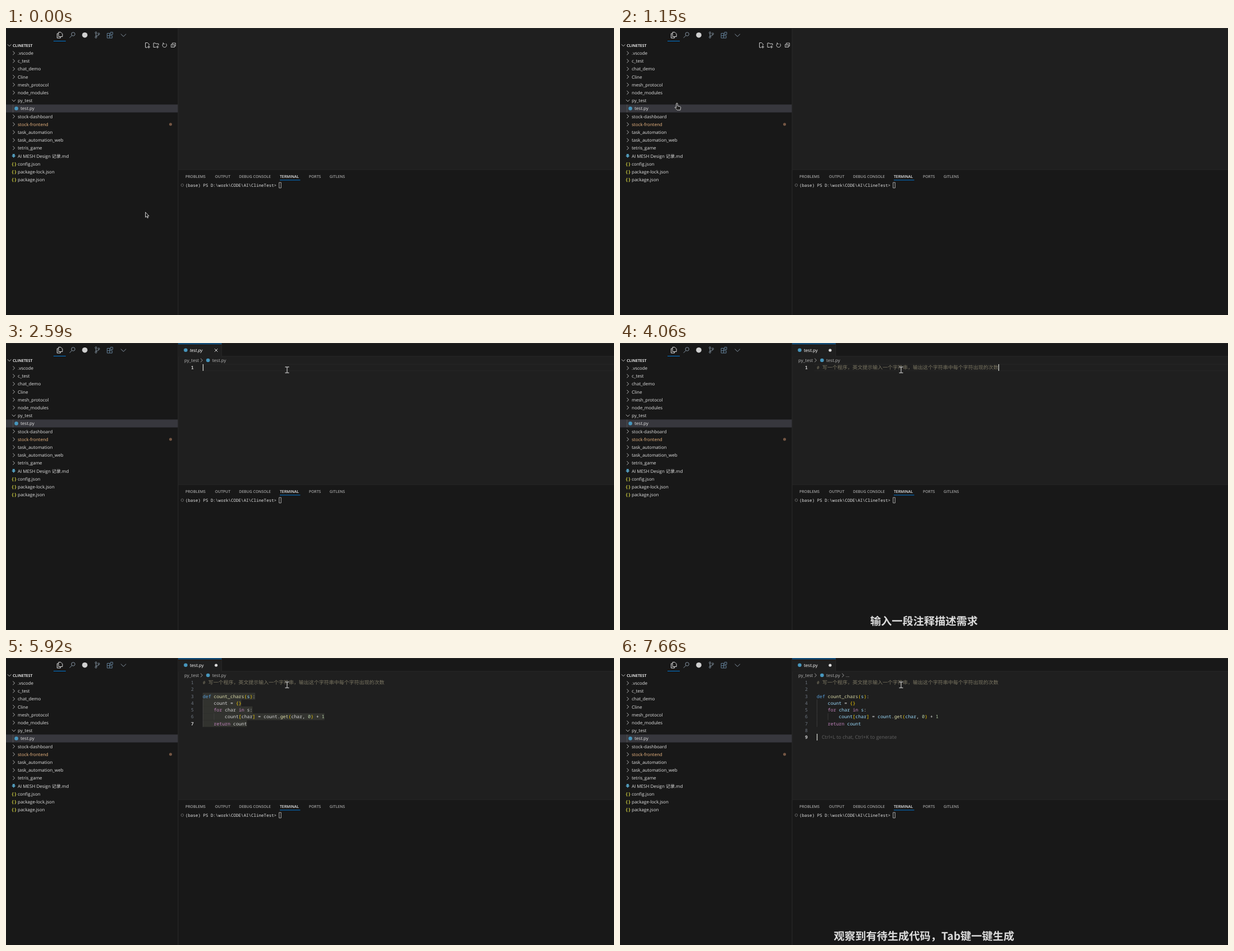
An HTML page for the animation above (8000 ms loop, 1088x515 px).

```html
<!DOCTYPE html>
<html lang="zh-CN">
<head>
<meta charset="utf-8">
<title>Code completion</title>
<style>
html, body { margin: 0; width: 100%; height: 100%; overflow: hidden; background: #181818; }
svg { display: block; width: 100vw; height: 100vh; }
text { white-space: pre; text-rendering: geometricPrecision; }
.ui { font: 8px "Open Sans", "Noto Sans CJK SC", "Noto Sans CJK", sans-serif; }
.hint { font: 8.85px "Open Sans", sans-serif; }
.caps { font: 600 6.85px "Open Sans", sans-serif; }
.code { font: 500 8.25px "Noto Sans Mono", "DejaVu Sans Mono", monospace; }
.term { font: 500 7.55px "Noto Sans Mono", "DejaVu Sans Mono", monospace; }
.cjk { font: 9px "Noto Sans CJK SC", "Noto Sans CJK", sans-serif; }
.caption { font: 700 19.25px "Noto Sans CJK SC", "Noto Sans CJK", sans-serif; text-anchor: middle; }
.italic { font-style: italic; }
.bold { font-weight: 700; }
.end { text-anchor: end; }
</style>
</head>
<body>
<svg viewBox="0 0 1088 515">
  <g id="base"></g>
  <g id="live"></g>
</svg>
<script>
const LOOP = 8000, ROW = 14.2, LINE = 12.25, CHAR = 4.95, CODE_X = 352, SIDEBAR = 308;
const rowY = i => 45 + ROW * i;
const lineY = n => 44 + LINE * (n - 1);

const rect = (x, y, w, h, fill) => `<rect x="${x}" y="${y}" width="${w}" height="${h}" fill="${fill}"/>`;
const dot = (x, y, r, fill) => `<circle cx="${x}" cy="${y}" r="${r}" fill="${fill}"/>`;
const stroke = (d, color = '#ccc', width = 1) =>
  `<path d="${d}" fill="none" stroke="${color}" stroke-width="${width}"/>`;
const label = (x, y, s, cls = 'ui', fill = '#e2e2e2') =>
  `<text x="${x}" y="${y}" class="${cls}" fill="${fill}">${s}</text>`;
const right = (x, y, color) => stroke(`M${x - 1.7} ${y - 3.2}l3.3 3.2l-3.3 3.2`, color, .9);
const down = (x, y, color) => stroke(`M${x - 3.2} ${y - 1.6}l3.2 3.3l3.2-3.3`, color, .9);

const folders = ['.vscode', 'c_test', 'chat_demo', 'Cline', 'mesh_protocol', 'node_modules', 'py_test', 'test.py',
  'stock-dashboard', 'stock-frontend', 'task_automation', 'task_automation_web', 'tetris_game'];
const files = ['AI MESH Design 记录.md', 'config.json', 'package-lock.json', 'package.json'];
const OPEN_ROW = 6, FILE_ROW = 7, CHANGED_ROW = 9;

function toolbar() {
  const dim = '#8494a2', blue = '#627f97';
  return stroke('M94 7.5h4l3 3v5h-7zM94 10h-2.5v8h6v-2.5', '#ddd') +
    rect(85, 23, 22, 1, '#0078d4') +
    stroke('M117 11a3.2 3.2 0 1 0 6.4 0a3.2 3.2 0 1 0-6.4 0M117.8 13.5l-4 4.2', dim) +
    dot(141, 12.7, 4.8, '#d0d0d0') +
    stroke('M159.5 8.5a1.5 1.5 0 1 0 3 0a1.5 1.5 0 1 0-3 0M161 10v5M159.5 16.5a1.5 1.5 0 1 0 3 0a1.5 1.5 0 1 0-3 0' +
      'M164.5 10.5a1.5 1.5 0 1 0 3 0a1.5 1.5 0 1 0-3 0M166 12q0 2-5 2.5', dim) +
    stroke('M181 9.5h4.5v8.5h-4.5zM181 13.7h9v4.3h-4.5M187 7.5h4v4h-4z', blue) +
    stroke('M205.5 10.8l4.7 4.5l4.7-4.5', dim);
}

const explorerActions =
  stroke('M253 35h-3.5v-8.5h4l2.5 2.5v2M255.5 31.5v5M253 34h5') +
  stroke('M268 34.5h-4v-7.5h3l1 1.2h5v3M271 31.5v5M268.5 34h5') +
  stroke('M281.5 28a3.7 3.7 0 1 0 4.5 0M281.3 26v2.6h2.6') +
  stroke('M295.5 29.5h6v5h-6zM297.5 29v-2h6v5.5h-1.5M297 32h3', '#ccc', .9);

function tree() {
  let out = down(6, 31) + label(12, 33.5, 'CLINETEST', 'caps bold');
  folders.forEach((name, i) => {
    const y = rowY(i);
    if (i === FILE_ROW) {
      out += rect(12, y - 7, .8, 14, '#585858') + dot(18.5, y, 3.3, '#4796bd') + label(26, y + 3, name);
      return;
    }
    out += i === OPEN_ROW ? down(14, y) : right(14, y);
    out += label(21, y + 3, name, 'ui', i === CHANGED_ROW ? '#efb984' : '#e2e2e2');
  });
  out += dot(294.5, rowY(CHANGED_ROW), 2.6, '#735543');
  files.forEach((name, i) => {
    const y = rowY(folders.length + i);
    out += i ? label(9.5, y + 2.8, '{}', 'code bold', '#cbcb41')
      : `<path d="M11.7 ${y - 3.5}h4v3h1.7l-3.7 4l-3.7-4h1.7z" fill="#519aba"/>`;
    out += label(21, y + 3, name);
  });
  return out;
}

function panel() {
  const tabs = [[321, 'PROBLEMS'], [374, 'OUTPUT'], [417, 'DEBUG CONSOLE'], [490, 'TERMINAL'], [542, 'PORTS'], [579, 'GITLENS']];
  return rect(SIDEBAR, 253.5, 780, 262, '#181818') + rect(SIDEBAR, 253.5, 780, 1, '#2b2b2b') +
    tabs.map(([x, s]) => label(x, 268.6, s, 'caps', s === 'TERMINAL' ? '#f0f0f0' : '#a4a4a4')).join('') +
    rect(490, 272.4, 36.5, 1, '#0078d4') +
    '<circle cx="315.5" cy="282" r="2.3" fill="none" stroke="#6c6c6c" stroke-width=".9"/>' +
    label(321, 284.8, '(base) PS D:\\work\\CODE\\AI\\ClineTest>', 'term', '#e4e4e4') +
    stroke('M488.7 277.2h3.6v9.8h-3.6z', '#ccc', .8);
}

base.innerHTML = rect(0, 0, 1088, 515, '#181818') + rect(SIDEBAR, 0, 780, 254, '#1f1f1f') + panel() +
  rect(307.5, 0, 1, 515, '#2b2b2b') + rect(0, 0, 1088, 1, '#2b2b2b');
const sidebar = toolbar() + tree();

const source = ['def count_chars(s):', '    count = {}', '    for char in s:',
  '        count[char] = count.get(char, 0) + 1', '    return count'];
const request = '写一个程序，英文提示输入一个字符串，输出这个字符串中每个字符出现的次数';

function highlight(line, variableColor) {
  const color = word =>
    word === 'def' ? '#569cd6' : /^(for|in|return)$/.test(word) ? '#c586c0' :
    /^(count_chars|get)$/.test(word) ? '#dcdcaa' : /\d/.test(word) ? '#b5cea8' :
    /\w/.test(word) ? (line.startsWith('def') ? '#9cdcfe' : variableColor) : '#ffd700';
  return line.replace(/\w+|[()[\]{}]/g, word => `<tspan fill="${color(word)}">${word}</tspan>`);
}

// Pointer path: time, x, y of the hot spot
const path = [[0, 249, 330], [140, 249, 330], [240, 251, 333], [390, 251, 333], [780, 205, 275], [870, 176, 219],
  [1000, 108, 141], [1150, 102, 136], [1200, 101, 135], [1390, 100, 143], [1650, 100, 143], [1930, 518, 64],
  [2110, 518, 64], [2360, 503, 48]];

function pointerAt(t) {
  const next = path.findIndex(p => p[0] > t);
  if (next < 0) return path[path.length - 1].slice(1);
  const [t0, x0, y0] = path[next - 1], [t1, x1, y1] = path[next];
  const k = (t - t0) / (t1 - t0);
  return [x0 + (x1 - x0) * k, y0 + (y1 - y0) * k];
}

function pointer(t) {
  const [x, y] = pointerAt(t).map(Math.round);
  let shape;
  if (x > SIDEBAR) shape = stroke('M-3.5-5h2.5l1 .8l1-.8h2.5M0-4v9M-3.5 5.5h2.5l1-.8l1 .8h2.5', '#b4b4b4', 1.3);
  else if (y < 280) shape = '<path d="M-1.3 7V0q0-1.2 1.2-1.2T1.1 0v4l4.6 1q1 .4 1 1.6l-.8 4.6H.5L-3.7 7q0-1.5 1.2-.9z"' +
    ' fill="#222" stroke="#e0e0e0" stroke-width=".9"/>';
  else shape = '<path d="M.5.5v9.2l2.1-1.9l1.5 3.2l1.4-.7l-1.5-3h2.8z" fill="#1a1a1a" stroke="#e0e0e0" stroke-width=".9"/>';
  return `<g transform="translate(${x} ${y})">${shape}</g>`;
}

// The explorer reacts slightly behind the pointer.
function explorerState(t) {
  const [x, y] = pointerAt(Math.max(0, t - 90));
  const inside = x < SIDEBAR, hovered = Math.round((y - 45) / ROW);
  const hover = inside && hovered <= 16 && hovered !== FILE_ROW
    ? rect(0, rowY(hovered) - 7.1, 307.5, ROW, '#2a2d2e') : '';
  const focused = t >= 1550 && t < 2520;
  return hover + rect(0, rowY(FILE_ROW) - 7.1, 307.5, ROW, focused ? '#04395e' : '#37373d') +
    (inside ? explorerActions : '');
}

// Caret: from, to, line, column offset in pixels
const carets = [[2590, 3050, 1, 0], [3350, 3810, 1, 10], [4060, 4640, 1, 325], [5130, 5360, 1, 325],
  [5360, 5920, 7, 80], [6280, 6510, 7, 80], [6510, 7000, 8, 0], [7460, 7660, 8, 0], [7660, 8000, 9, 0]];

function editor(t) {
  if (t < 1600) return '';
  const dirty = t >= 3350, accepted = t >= 5360;
  const active = t >= 7660 ? 9 : t >= 6510 ? 8 : accepted ? 7 : 1;
  const mid = lineY(active), soft = '#b4b4b4';
  let out = rect(SIDEBAR, 1, 780, 23, '#181818') + rect(SIDEBAR, 23.5, 780, .8, '#2b2b2b') +
    rect(SIDEBAR, 1, 78, 23.5, '#1f1f1f') + rect(385.5, 1, .8, 23, '#2b2b2b') + rect(SIDEBAR, 1, 78, 1, '#0078d4') +
    dot(321.5, 12.8, 3.3, '#4796bd') + label(329, 15.8, 'test.py', dirty ? 'ui' : 'ui italic', '#fff') +
    (dirty ? dot(376, 13, 2.6, '#ddd') : stroke('M373.3 10.3l5.4 5.4M378.7 10.3l-5.4 5.4', '#ddd'));

  out += label(319, 34, 'py_test', 'ui', soft) + right(350, 31, soft) +
    dot(361.5, 31, 3.3, '#4796bd') + label(369, 34, 'test.py', 'ui', soft);
  if (t >= 6740) out += right(399, 31, soft) + label(404, 34, '...', 'ui', soft);

  if (!accepted) out += stroke(`M${CODE_X - 4} ${mid - 5.8}H1088M${CODE_X - 4} ${mid + 5.8}H1088`, '#292929', .9);
  for (let n = 1; n <= active; n++)
    out += label(336, lineY(n) + 3, n, n === active ? 'code end bold' : 'code end', n === active ? '#ccc' : '#6e7681');

  if (dirty) out += label(CODE_X, 47, '#', 'code', '#7b7662');
  if (t >= 4060) out += label(CODE_X + 2 * CHAR, 47, request, 'cjk', '#7b7662');

  if (t >= 4790) source.forEach((line, i) => {
    const y = lineY(i + 3);
    if (!accepted) {
      out += label(CODE_X, y + 3, line, 'code italic', '#767676');
      return;
    }
    if (t >= 5810 && t < 7660) out += rect(CODE_X, y - 6.1, line.length * CHAR, LINE, '#32332f');
    if (i) out += rect(CODE_X, y - 6.1, .7, LINE, '#454545');
    if (i === 3) out += rect(CODE_X + 4 * CHAR, y - 6.1, .7, LINE, '#454545');
    out += label(CODE_X, y + 3, highlight(line, t >= 6840 ? '#9cdcfe' : '#d4d4d4'), 'code');
  });
  if (t >= 6510) out += label(361, mid + 3, 'Ctrl+L to chat, Ctrl+K to generate', 'hint', '#626262');

  const caret = carets.find(([from, to]) => t >= from && t < to);
  if (caret) out += rect(CODE_X + caret[3], lineY(caret[2]) - 6, 1.3, 12, '#cfd2cc');
  return out;
}

function caption(t) {
  const words = t >= 6250 ? '观察到有待生成代码，Tab键一键生成' : t >= 3450 && t < 5080 ? '输入一段注释描述需求' : '';
  return words && label(544, 505.8, words, 'caption', '#dcdcdc');
}

let shown = '';
function tick(now) {
  const t = now % LOOP;
  const picture = explorerState(t) + sidebar + editor(t) + caption(t) + pointer(t);
  if (picture !== shown) live.innerHTML = shown = picture;
  requestAnimationFrame(tick);
}
tick(0);
</script>
</body>
</html>
```
